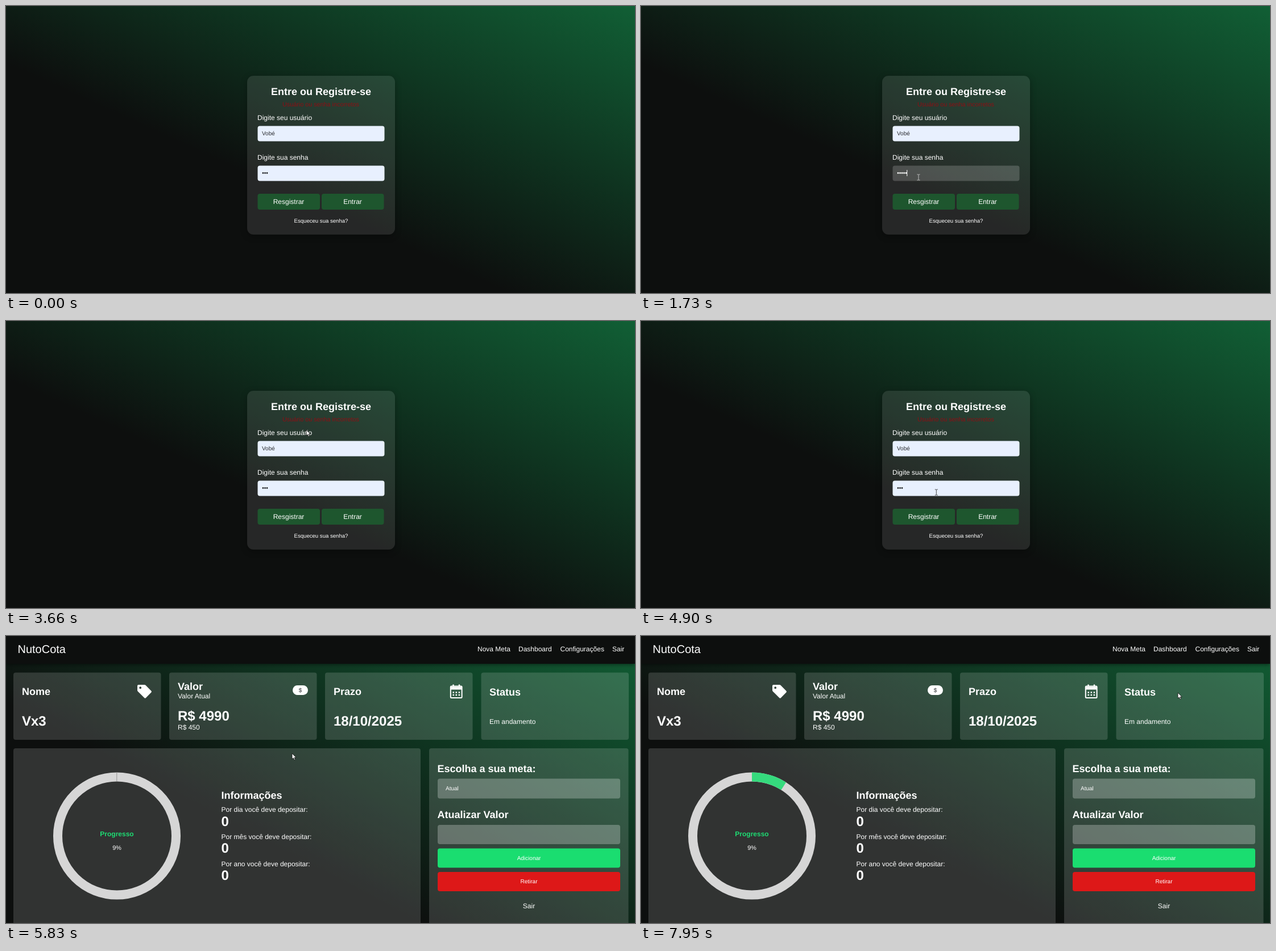
An HTML page that plays this animation: 1106 px wide and 506 px high, repeating every 8 s.

```html
<!DOCTYPE html>
<html lang="pt-BR">
<head>
<meta charset="utf-8">
<title>Metas</title>
<style>
  html, body { margin: 0; width: 100%; height: 100%; overflow: hidden; background: #0d0f0e; }
  #stage { position: relative; width: 1106px; height: 506px; overflow: hidden; }
  .page, .page svg, #pointer { position: absolute; left: 0; top: 0; width: 1106px; height: 506px; }
  .page { background: linear-gradient(to top right, #0d0f0e 40%, #115f35) 0 0 / 1106px 506px no-repeat; }
  #board { background-size: 1106px 590px; visibility: hidden; }
  .card { position: absolute; left: 424px; top: 123px; width: 260px; height: 280px; border-radius: 11px;
    background: rgba(255,255,255,.1); box-shadow: 0 3px 12px rgba(0,0,0,.3); }
  .bar { position: absolute; left: 0; top: 0; width: 100%; height: 49px; background: #0d0f0e;
    box-shadow: 0 1px 7px rgba(0,0,0,.55); }
  text { font: 12px "Liberation Sans", Arial, sans-serif; fill: #fff; text-rendering: geometricPrecision; }
  .mid { text-anchor: middle; }
  .logo { font-size: 20px; }
  .h { font-size: 18px; font-weight: bold; }
  .big { font-size: 24px; font-weight: bold; }
  .small { font-size: 10px; }
  .link { font-size: 9.6px; }
  .error { font-size: 10.8px; fill: #8d0f14; }
  .dark { fill: #2b2d30; }
  .tip { font: 8.3px "Open Sans", "Noto Sans", sans-serif; }
  .field { fill: #e8f0fe; }
  .btn { fill: #1e562e; }
  .glass { fill: rgba(255,255,255,.15); }
  .input { fill: rgba(255,255,255,.25); }
  .dots { fill: none; stroke-linecap: round; }
</style>
</head>
<body>
<div id="stage">
  <div class="page" id="login">
    <div class="card"></div>
    <svg viewBox="0 0 1106 506">
      <text class="h mid" x="554" y="157">Entre ou Registre-se</text>
      <text class="error mid" x="553.5" y="177">Usuário ou senha incorretos</text>
      <text x="442" y="201">Digite seu usuário</text>
      <rect class="field" x="442.5" y="211.5" width="223" height="27" rx="4"/>
      <text class="small dark" x="450" y="228">Vobé</text>
      <text x="442" y="271">Digite sua senha</text>
      <rect class="field" id="pass" x="442.5" y="281.5" width="223" height="27" rx="4"/>
      <path class="dots" id="dots" stroke-width="2.8" stroke-dasharray="0 3.5"/>
      <rect id="caret" y="289" width="1" height="11"/>
      <rect class="btn" x="442.5" y="331" width="109.5" height="28" rx="4"/>
      <rect class="btn" x="555" y="331" width="109.5" height="28" rx="4"/>
      <text class="mid" x="497" y="349">Resgistrar</text>
      <text class="mid" x="609.5" y="349">Entrar</text>
      <text class="link mid" x="554" y="382">Esqueceu sua senha?</text>
      <g id="popup">
        <path d="M518 315h9l5.500-5 5.500 5h93a2 2 0 0 1 2 2v79.500a2 2 0 0 1-2 2h-113a2 2 0 0 1-2-2v-79.500a2 2 0 0 1 2-2z" stroke="#4a4d4b" stroke-width=".8"/>
        <path d="M516 364.500h117" stroke="#555"/>
        <circle cx="531" cy="340" r="5.500" fill="#9aa0a6"/>
        <path d="M526.500 338l3.500 3.500v3M531 335.500v2.500l-2 1.500h4l1.500 2 1 1" fill="none" stroke="#000" stroke-width="1.300"/>
        <text class="tip" x="546" y="336.500">Vobé</text>
        <path class="dots" d="M548 347.500h7.500" stroke="#fff" stroke-width="2.600" stroke-dasharray="0 3.700"/>
        <text class="tip" x="525" y="385">Gerenciar senhas...</text>
        <g fill="none" stroke="#9aa0a6" stroke-width="2">
          <circle cx="613.700" cy="381" r="2.800"/>
          <path d="M616.500 381h6.500M620.500 381v3"/>
        </g>
      </g>
    </svg>
  </div>

  <div class="page" id="board">
    <div class="bar"></div>
    <svg viewBox="0 0 1106 506">
      <text class="logo" x="20.500" y="29.500">NutoCota</text>
      <text x="829" y="27">Nova Meta</text>
      <text x="901" y="27">Dashboard</text>
      <text x="974.500" y="27">Configurações</text>
      <text x="1066" y="27">Sair</text>

      <g class="glass">
        <rect x="13" y="64.500" width="259.500" height="118.500" rx="4"/>
        <rect x="287" y="64.500" width="259.500" height="118.500" rx="4"/>
        <rect x="561" y="64.500" width="259.500" height="118.500" rx="4"/>
        <rect x="835.500" y="64.500" width="259.500" height="118.500" rx="4"/>
        <rect x="13" y="198" width="716" height="330" rx="4"/>
        <rect x="744" y="198" width="350.500" height="330" rx="4"/>
      </g>

      <text class="h" x="28" y="104">Nome</text>
      <text class="big" x="28" y="158">Vx3</text>
      <path fill="#fff" fill-rule="evenodd" d="M233 86h10.500q1.200 0 2 .8l9.800 9.900q1.300 1.400 0 2.800l-9.300 9.600q-1.400 1.200-2.800 0l-11.300-11.300q-.9-.8-.9-2v-7.800q0-2 2-2zm3.200 3.300a1.900 1.900 0 1 0 .01 0z"/>

      <text class="h" x="302" y="95">Valor</text>
      <text x="302" y="110">Valor Atual</text>
      <text class="big" x="302" y="149">R$ 4990</text>
      <text x="302" y="165">R$ 450</text>
      <rect x="504" y="87" width="27" height="17" rx="8.500" fill="#fff"/>
      <text class="small dark mid" x="517.500" y="99">$</text>

      <text class="h" x="576" y="104">Prazo</text>
      <text class="big" x="576" y="158">18/10/2025</text>
      <g fill="none" stroke="#fff" stroke-width="2">
        <rect x="781.800" y="88.500" width="19.800" height="20.500" rx="1.500"/>
        <path d="M782 92h19.500" stroke-width="5"/>
        <path d="M786.500 85.500v4M797 85.500v4" stroke-width="2.400"/>
        <path d="M785.500 99.500h13M785.500 104h13" stroke-width="2.400" stroke-dasharray="2.400 2.700"/>
      </g>

      <text class="h" x="850" y="105">Status</text>
      <text x="850" y="155">Em andamento</text>

      <g fill="none" stroke-width="16">
        <circle cx="195" cy="352.500" r="104" stroke="#d6d6d6"/>
        <circle id="arc" cx="195" cy="352.500" r="104" stroke="#35da7d" pathLength="100" transform="rotate(-90 195 352.500)"/>
        <path id="seam" d="M194.800 240.500v16" stroke="#858585" stroke-width=".8"/>
      </g>
      <text class="mid" x="195" y="352.500" style="font-weight:bold;fill:#1edc73">Progresso</text>
      <text class="mid" x="195" y="376.500" style="font-size:10.800px">9%</text>

      <text class="h" x="378.500" y="287">Informações</text>
      <text x="378.500" y="310">Por dia você deve depositar:</text>
      <text class="big" x="378.500" y="334.500">0</text>
      <text x="378.500" y="357.500">Por mês você deve depositar:</text>
      <text class="big" x="378.500" y="382">0</text>
      <text x="378.500" y="405.500">Por ano você deve depositar:</text>
      <text class="big" x="378.500" y="430">0</text>

      <text class="h" x="758.500" y="240">Escolha a sua meta:</text>
      <rect class="input" x="759" y="251.500" width="321" height="35" rx="4"/>
      <text class="small" x="773" y="272">Atual</text>
      <text class="h" x="758.500" y="321">Atualizar Valor</text>
      <rect class="input" x="759" y="333" width="321" height="34" rx="4"/>
      <rect x="759" y="374.500" width="321" height="34" rx="4" fill="#1add70"/>
      <text class="small mid" x="919.500" y="394.500">Adicionar</text>
      <rect x="759" y="416" width="321" height="34" rx="4" fill="#dd1818"/>
      <text class="small mid" x="919.500" y="436">Retirar</text>
      <text class="mid" x="919.500" y="480">Sair</text>
    </svg>
  </div>

  <svg id="pointer" viewBox="0 0 1106 506">
    <path id="arrow" d="M0 0v10l2.300-2.100 1.700 3.700 1.600-.7-1.600-3.600h3.100z" fill="#fff" stroke="#111" stroke-width=".8"/>
    <path id="beam" d="M-2.500-5h2l.5.500.5-.5h2M0-4.500v9M-2.500 5h2l.5-.5.5.5h2" fill="none" stroke-width=".9"/>
  </svg>
</div>
<script>
  const LOOP = 8000, ENTER = 5830;
  const $ = id => document.getElementById(id);
  const show = (id, on) => { $(id).style.visibility = on ? 'visible' : 'hidden'; };
  const clamp = v => Math.max(0, Math.min(1, v));

  // pointer path: time, x, y
  const track = [
    [260, 861, 421], [420, 690, 350], [580, 505, 288], [700, 488, 302],
    [2400, 488, 302], [2600, 664, 379], [2670, 656, 388], [2860, 616, 346],
    [2960, 612, 343], [3190, 532, 190], [3270, 532, 190], [3660, 528, 192],
    [3850, 515, 206], [4060, 503, 225], [4140, 503, 226], [4300, 497, 262],
    [4480, 503, 302], [4750, 503, 302], [5000, 530, 302], [5480, 620, 337],
    [5570, 620, 337], [5770, 504, 217], [5830, 503, 207], [7040, 503, 207],
    [7180, 456, 300], [7350, 650, 342], [7540, 1060, 300], [7800, 897, 193],
    [7870, 897, 193], [7945, 944, 100]
  ];

  function pointerAt(t) {
    const i = track.findIndex(p => p[0] > t);
    if (i < 0) return track[track.length - 1].slice(1);
    const [t0, x0, y0] = track[Math.max(0, i - 1)], [t1, x1, y1] = track[i];
    const k = clamp((t - t0) / (t1 - t0));
    return [x0 + (x1 - x0) * k, y0 + (y1 - y0) * k];
  }

  function drawLogin(t) {
    const typed = t >= 1450 && t < 2990;
    const count = typed ? 3 + [1470, 1680, 1900, 2130].filter(k => t >= k).length : 3;
    const ink = typed ? '#fff' : '#202124';
    $('pass').style.fill = typed ? 'rgba(255,255,255,.18)' : '';
    $('dots').setAttribute('d', `M452 294.5h${(count - 1) * 3.5 + .1}`);
    $('dots').setAttribute('stroke', ink);
    $('caret').setAttribute('x', 449.8 + count * 3.5);
    $('caret').setAttribute('fill', ink);
    show('caret', t >= 920 && t < 2600);
    $('popup').style.opacity = t < 1450 ? clamp((t - 960) / 190) : clamp((1520 - t) / 70);
    return typed;
  }

  function drawChart(t) {
    const p = clamp((t - 5865) / 1000);
    const share = 9 * (1 - (1 - p) ** 4);
    $('arc').setAttribute('stroke-dasharray', `${share} 100`);
    show('arc', share > 0);
    show('seam', share < .3 && t >= ENTER);
  }

  function drawPointer(t, typed) {
    const [x, y] = pointerAt(t);
    const inUser = y > 212 && y < 238, inPass = y > 282 && y < 309;
    const text = t < 5500 && x > 442 && x < 665 && (inUser || inPass);
    const at = `translate(${x} ${y})`;
    $('arrow').setAttribute('transform', at);
    $('beam').setAttribute('transform', at);
    $('beam').setAttribute('stroke', typed && inPass ? '#ccc' : '#333');
    show('arrow', t >= 260 && !text);
    show('beam', t >= 260 && text);
  }

  const start = performance.now();
  function tick() {
    const t = (performance.now() - start) % LOOP;
    const inside = t >= ENTER;
    show('login', !inside);
    show('board', inside);
    const typed = drawLogin(t);
    if (inside) show('caret', false);
    drawChart(t);
    if (!inside) show('arc', false);
    drawPointer(t, typed);
    requestAnimationFrame(tick);
  }
  tick();
</script>
</body>
</html>
```
